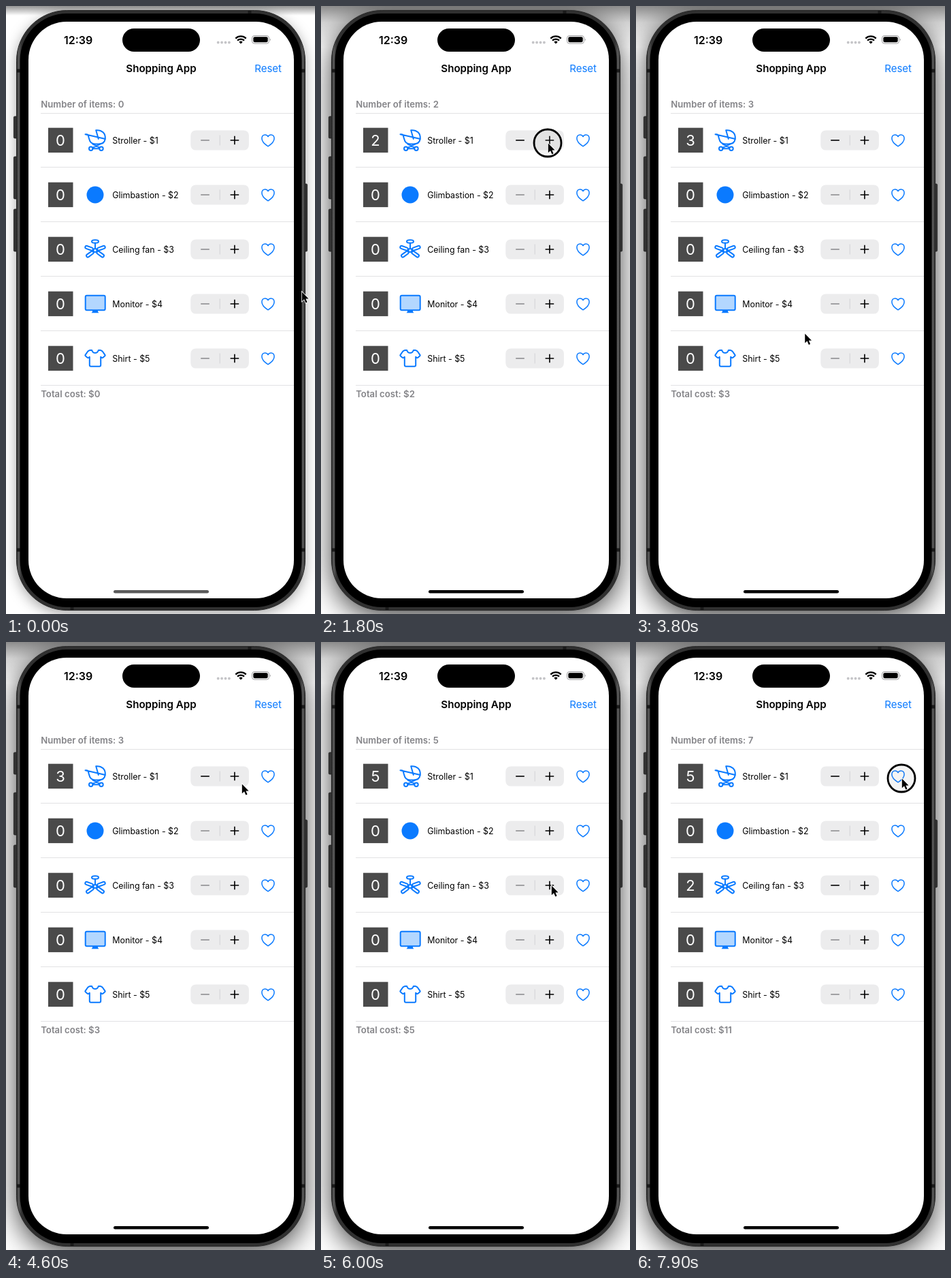
An HTML page that plays this animation: 454 by 892 pixels, repeating every 8 s.

```html
<!DOCTYPE html>
<html lang="en">
<head>
<meta charset="utf-8">
<title>Shopping App</title>
<style>
  html, body { margin: 0; width: 100%; height: 100%; overflow: hidden; background: #fff; }
  #stage { position: relative; width: 454px; height: 892px; overflow: hidden; background: #fff; }
  #stage::before {
    content: ""; position: absolute; inset: 0 0 auto; height: 14px;
    background: linear-gradient(rgba(0,0,0,.42), transparent);
  }
  #stage.active::before { height: 60px; background: linear-gradient(rgba(0,0,0,.45), rgba(0,0,0,.16) 40%, transparent); }
  #shadow {
    position: absolute; left: 16px; top: 7px; width: 423px; height: 879px; border-radius: 74px;
    box-shadow: 0 5px 20px rgba(0,0,0,.38);
  }
  .active #shadow { box-shadow: 0 10px 42px rgba(0,0,0,.75), 0 0 3px rgba(0,0,0,.3); }
  svg { position: absolute; left: 0; top: 0; }
  text { font-family: Inter, "Open Sans", sans-serif; }
  .label { font-size: 12.4px; }
  .head { font-size: 13.2px; font-weight: 600; fill: #848488; }
  .badge { font-size: 22px; fill: #fff; text-anchor: middle; }
  .blue { fill: none; stroke: #0a7aff; stroke-width: 2; stroke-linecap: round; stroke-linejoin: round; }
  .solid { fill: #0a7aff; stroke: none; }
</style>
</head>
<body>
<div id="stage">
  <div id="shadow"></div>
  <svg width="454" height="892" viewBox="0 0 454 892">
    <defs>
      <linearGradient id="side" x2="1" y2="0">
        <stop offset="0" stop-color="#252525"/><stop offset=".007" stop-color="#5a5a5a"/>
        <stop offset=".018" stop-color="#303030"/><stop offset=".982" stop-color="#303030"/>
        <stop offset=".993" stop-color="#5a5a5a"/><stop offset="1" stop-color="#252525"/>
      </linearGradient>
    </defs>

    <g fill="#333" stroke="#1c1c1c" stroke-width=".8">
      <rect x="11.4" y="162" width="6" height="32" rx="1.5"/>
      <rect x="11.4" y="221" width="6" height="62" rx="1.5"/>
      <rect x="11.4" y="298" width="6" height="62" rx="1.5"/>
      <rect x="437" y="261" width="5.6" height="99" rx="1.5"/>
    </g>
    <rect x="15.5" y="6.5" width="424" height="880" rx="74" fill="url(#side)" stroke="#252525"/>
    <path d="M16 95h5M434 95h5M16 798h5M434 798h5M358 7v4M97 882v4" stroke="#1a1a1a" stroke-width="5"/>
    <rect x="20.5" y="11" width="414" height="871" rx="69"/>
    <rect x="33" y="23" width="390" height="846" rx="56" fill="#fff"/>

    <rect x="171" y="33" width="114" height="34" rx="17"/>
    <text x="85" y="55.5" font-size="16" font-weight="600">12:39</text>
    <g fill="#c5c5c8">
      <circle cx="311.7" cy="53.5" r="1.9"/><circle cx="317.1" cy="53.5" r="1.9"/>
      <circle cx="322.5" cy="53.5" r="1.9"/><circle cx="327.9" cy="53.5" r="1.9"/>
    </g>
    <path d="M337.3 47.6a11 11 0 0 1 15.4 0M340 50.6a7.1 7.1 0 0 1 10 0" fill="none" stroke="#000" stroke-width="2.3"/>
    <path d="M345 55.4l-2.7-2.7a3.9 3.9 0 0 1 5.4 0z"/>
    <rect x="361.5" y="43.5" width="25" height="11.6" rx="3.6" fill="none" stroke="#9c9c9e"/>
    <rect x="363.3" y="45.3" width="21.4" height="8" rx="2.2"/>
    <path d="M388 47.5q2 1.8 0 3.8z" fill="#9c9c9e"/>

    <text x="228" y="97.3" font-size="15.1" font-weight="600" text-anchor="middle">Shopping App</text>
    <text x="405" y="97.3" font-size="15" text-anchor="end" fill="#0a7aff">Reset</text>
    <text id="items" class="head" x="51.2" y="149"></text>
    <path d="M51 157.5h372" stroke="#e2e2e4"/>
    <g id="rows"></g>
    <text id="cost" class="head" x="51.2" y="574"></text>
    <rect id="home" x="158" y="857" width="140" height="4.6" rx="2.3"/>

    <g id="pointer">
      <circle id="ring" cx="0" cy="1" r="20" fill="rgba(120,120,120,.08)" stroke="#000" stroke-width="2.8"/>
      <path d="M.8 1.4V15.2L4 12.2 6.4 17.6 8.6 16.6 6.4 11.4H10.6Z" stroke="#fff" stroke-width="1.6" paint-order="stroke"/>
    </g>
  </svg>
</div>
<script>
  const LOOP = 8000, STEP = 100;
  const $ = id => document.getElementById(id);

  const blade = angle =>
    `<rect x="3.5" y="-2.1" width="12" height="4.2" rx="2.1" transform="translate(0 1.5) rotate(${angle})"/>`;

  // Icons are drawn around the centre of their row.
  const products = [
    { name: 'Stroller', price: 1, icon: `
      <path d="M-14.5 -8.8h2q1.6 0 2.1 1.6L-8.8 -2C-7.5 4 -4.5 5.5 0 5.5H5C10.5 5.5 14 3 14.7 -2Z" />
      <path d="M14.7 -2C15.6 -10 10 -15.5 1.2 -14.8L4.8 -2" />
      <path d="M-3.5 5.5L6.5 10.8M7.5 5.5L-3.5 10.8M-3.5 12.3H6"/>
      <circle cx="-6.3" cy="12.2" r="2.7"/><circle cx="9" cy="12.2" r="2.7"/>` },
    { name: 'Glimbastion', price: 2, icon: '<circle class="solid" r="12.5"/>' },
    { name: 'Ceiling fan', price: 3, icon: `
      <ellipse cy="-11.5" rx="5" ry="2.2"/><path d="M0 -9.3V-2"/>
      ${[-20, 36, 144, 200].map(blade).join('')}
      <circle cy="1.5" r="2.6" fill="#fff"/>` },
    { name: 'Monitor', price: 4, icon: `
      <rect x="-14.3" y="-12.2" width="29" height="21.4" rx="2" fill="#b3d7ff"/>
      <path class="solid" d="M-4 9.5H4V11.5L5.5 13.2H-5.5L-4 11.5Z"/>` },
    { name: 'Shirt', price: 5, icon: `
      <path d="M-4.8 -12H-7.5Q-9.5 -11.8 -11 -10L-14.4 -5.2Q-15 -4.3 -14.1 -3.5L-11.2 -1Q-10.3 -.4 -9.4 -1.2L-8.2 -2.2V9.8Q-8.2 11.8 -6.2 11.8H6.2Q8.2 11.8 8.2 9.8V-2.2L9.4 -1.2Q10.3 -.4 11.2 -1L14.1 -3.5Q15 -4.3 14.4 -5.2L11 -10Q9.5 -11.8 7.5 -12H4.8Q3.8 -8 0 -8T-4.8 -12Z"/>` },
  ];

  $('rows').innerHTML = products.map((p, i) => `
    <g transform="translate(0 ${197 + 80 * i})">
      <rect x="62" y="-18.3" width="36.5" height="36.4" fill="#4a4a4a"/>
      <text class="badge" x="80" y="8"></text>
      <g class="blue" transform="translate(131 0)">${p.icon}</g>
      <text class="label" x="156.3" y="4.6">${p.name} - $${p.price}</text>
      <rect x="271.3" y="-14.6" width="85.6" height="29.2" rx="7.5" fill="#ececed"/>
      <path d="M314.2 -7.5v15" stroke="#d3d3d6"/>
      <path class="minus" d="M286.2 0h12.6" stroke-width="1.6"/>
      <path d="M329.6 0h12.6M335.9 -6.3v12.6" stroke="#000" stroke-width="1.6"/>
      <path class="blue" style="stroke-width:1.5" d="M385 8.8C379 5.2 375.9 1.3 375.9 -2.7C375.9 -6 378 -8.1 380.6 -8.1C382.5 -8.1 384.1 -7.1 385 -5.2C385.9 -7.1 387.5 -8.1 389.4 -8.1C392 -8.1 394.1 -6 394.1 -2.7C394.1 1.3 391 5.2 385 8.8Z"/>
      <path d="M51 39.5h372" stroke="#e2e2e4"/>
    </g>`).join('');
  const badges = document.querySelectorAll('.badge');
  const minuses = document.querySelectorAll('.minus');

  // time, x, y of the pointer tip
  const path = [
    [0, 434, 418], [600, 333, 200], [2200, 333, 200], [2800, 213, 480], [3000, 207, 523],
    [3300, 210, 586], [3500, 214, 574], [4400, 343, 209], [4600, 346, 207], [4800, 338, 203],
    [5600, 338, 203], [6000, 338, 356], [6900, 338, 356], [7600, 398, 205], [7800, 390, 199], [LOOP, 390, 199],
  ];
  const presses = [[600, 900], [1100, 1400], [1800, 2100], [4800, 5100], [5400, 5700], [6100, 6200], [6600, 6800], [7900, LOOP]];
  // time, row that gains one
  const additions = [[800, 0], [1200, 0], [1900, 0], [4900, 0], [5500, 0], [6200, 2], [6700, 2]];

  function pointerAt(t) {
    const i = path.findIndex(p => p[0] > t);
    const [t0, x0, y0] = path[i - 1], [t1, x1, y1] = path[i];
    const u = (t - t0) / (t1 - t0), k = u * u * (3 - 2 * u);
    return [x0 + (x1 - x0) * k, y0 + (y1 - y0) * k];
  }

  function draw(t) {
    const counts = products.map((_, row) => additions.filter(a => a[1] === row && a[0] <= t).length);
    counts.forEach((n, i) => {
      badges[i].textContent = n;
      minuses[i].setAttribute('stroke', n ? '#000' : '#8e8e91');
    });
    $('items').textContent = 'Number of items: ' + counts.reduce((sum, n) => sum + n, 0);
    $('cost').textContent = 'Total cost: $' + counts.reduce((sum, n, i) => sum + n * products[i].price, 0);
    $('stage').classList.toggle('active', t >= 600);
    $('home').setAttribute('fill', t < 800 ? '#5a5a5a' : '#000');
    $('ring').style.display = presses.some(([from, to]) => t >= from && t < to) ? '' : 'none';
    $('pointer').setAttribute('transform', `translate(${pointerAt(t)})`);
  }

  const start = performance.now();
  function tick() {
    const t = (performance.now() - start) % LOOP;
    draw(Math.floor(t / STEP) * STEP);
    requestAnimationFrame(tick);
  }
  tick();
</script>
</body>
</html>
```
